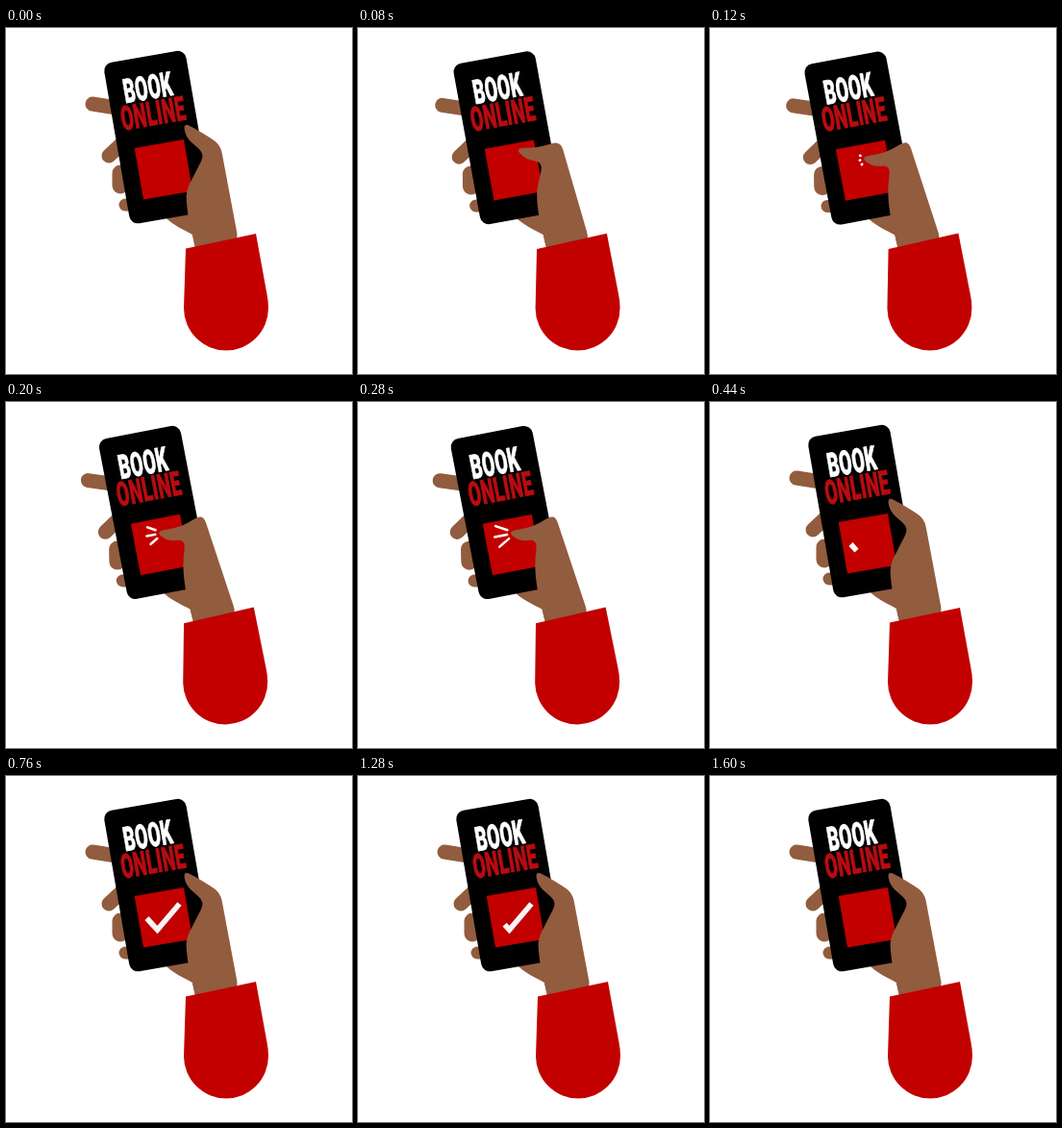
Write an HTML page that moves like this. It is 360 by 360 pixels and loops after 1640 ms.

```html
<!DOCTYPE html>
<html lang="en">
<head>
<meta charset="utf-8">
<title>Book online</title>
<style>
  html, body { margin: 0; width: 100%; height: 100%; overflow: hidden; background: #fff; }
  svg { display: block; width: 100vw; height: 100vh; }
  .skin { fill: #925c3e; }
  .fingers { stroke: #925c3e; stroke-linecap: round; }
  .red { fill: #c20000; }
  .sparks { stroke: #fff; stroke-width: 2.5; stroke-linecap: round; }
  .check { fill: none; stroke: #f6f6f6; stroke-width: 5.6; }
  text { font: 900 35px Roboto, "Liberation Sans", sans-serif; text-anchor: middle; letter-spacing: .5px; }
</style>
</head>
<body>
<svg viewBox="0 0 360 360">
  <g id="arm">
    <g class="fingers">
      <path d="M90 79L115 83" stroke-width="15"/>
      <path d="M107 133L122 119" stroke-width="15"/>
      <path d="M119 151V164" stroke-width="17"/>
      <path d="M124 184H135" stroke-width="13"/>
    </g>
    <path class="skin" d="M165 196C172 204 185 210 194 215L197 230L225 222L215 185Z"/>
    <g transform="translate(100.8 37.2) rotate(-9.8)">
      <rect width="86.5" height="170" rx="9"/>
      <g transform="scale(.54 1)" stroke-width=".8">
        <text x="77.5" y="44.5" fill="#fff" stroke="#fff">BOOK</text>
        <text x="79" y="72" fill="#b80c10" stroke="#b80c10">ONLINE</text>
      </g>
      <rect class="red" x="17.5" y="92" width="52" height="54.5"/>
    </g>
    <path id="check" class="check" pathLength="1" d="M146.5 148L157.5 160L180.5 133"/>
    <path id="sparks" class="sparks"/>
    <path id="hand" class="skin"/>
    <path class="red" d="M187 229.5L260 214L271.5 277Q273 284 273 291.5A44 44 0 0 1 185 291.5Z"/>
  </g>
</svg>
<script>
const LOOP = 1640, STEP = 40;
const $ = id => document.getElementById(id);
const mix = (a, b, p) => a + (b - a) * p;
const span = (t, from, to) => Math.min(1, Math.max(0, (t - from) / (to - from)));
const smooth = p => p * p * (3 - 2 * p);
const easeOut = p => Math.sin(p * Math.PI / 2);
const mixPoint = (a, b, p) => [mix(a[0], b[0], p), mix(a[1], b[1], p)];

// Joints that move with the thumb; the wrist stays still.
const raised = { web: [207, 131], under: [187, 114], tip: [184.5, 98], bend: [204, 109], knuckle: [223, 121] };
const pressed = { web: [190, 142], under: [172, 144], tip: [159, 133.5], bend: [186, 129], knuckle: [209, 116] };
const wrist = [[242, 222], [197, 230], [194, 215], [189, 194], [187, 170]];

// Closed polygon with every corner softened.
function rounded(points, radius) {
  const corner = (point, i) => {
    const toward = other => {
      const length = Math.hypot(other[0] - point[0], other[1] - point[1]);
      return mixPoint(point, other, Math.min(.5, radius / length));
    };
    const before = points.at(i - 1), after = points[(i + 1) % points.length];
    return `${toward(before)}Q${point} ${toward(after)}`;
  };
  return "M" + points.map(corner).join("L") + "Z";
}

function drawHand(press) {
  const thumb = Object.keys(raised).map(joint => mixPoint(raised[joint], pressed[joint], press));
  $("hand").setAttribute("d", rounded([...thumb, ...wrist], 9));
}

// Three rays fan out from the thumb tip, then leave from the inside.
function drawSparks(t) {
  const inner = mix(9, 22, smooth(span(t, 290, 390)));
  const outer = Math.max(inner + .1, mix(9, 22, smooth(span(t, 100, 260))));
  const at = (angle, r) => [167.7 - r * Math.cos(angle), 135 - r * Math.sin(angle)];
  const rays = [20, -10, -40].map(degrees => {
    const angle = degrees * Math.PI / 180;
    return `M${at(angle, inner)}L${at(angle, outer)}`;
  });
  $("sparks").setAttribute("d", t > 100 && t < 390 ? rays.join("") : "");
}

function drawCheck(t) {
  const end = easeOut(span(t, 400, 760)), start = easeOut(span(t, 1240, 1600));
  const check = $("check"), length = end - start;
  check.setAttribute("visibility", length > .001 ? "visible" : "hidden");
  check.setAttribute("stroke-dasharray", `${length} 2`);
  check.setAttribute("stroke-dashoffset", -start);
}

function draw(t) {
  const hold = 1 - smooth(span(t, 290, 430));
  const tilt = -1.1 * easeOut(span(t, 0, 250)) * hold;
  $("arm").setAttribute("transform", `rotate(${tilt} 229 335)`);
  drawHand(smooth(span(t, 0, 120)) * hold);
  drawSparks(t);
  drawCheck(t);
}

const begin = performance.now();
function tick() {
  const t = (performance.now() - begin) % LOOP;
  draw(Math.floor(t / STEP) * STEP);
  requestAnimationFrame(tick);
}
tick();
</script>
</body>
</html>
```
